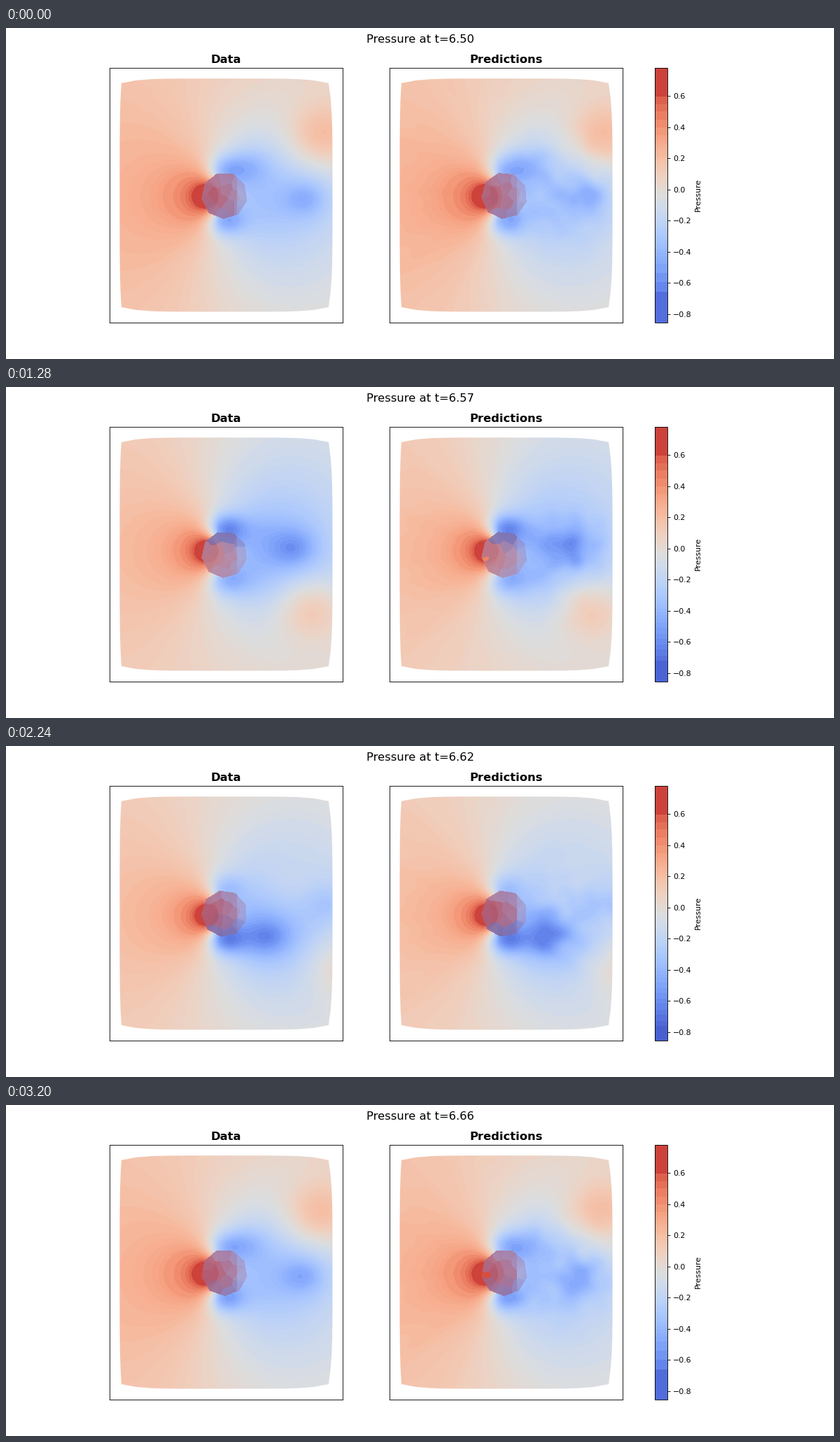
A matplotlib script that plays this animation: 1183 px wide and 473 px high, repeating every 3.36 s.

```python
import numpy as np
import matplotlib.pyplot as plt
from matplotlib.animation import FuncAnimation
from matplotlib.colors import ListedColormap
from matplotlib.patches import Polygon

W, H, DPI = 1183, 473, 78.85
FRAMES, INTERVAL = 21, 160
PERIOD = 20.45              # frames per vortex shedding cycle
VMIN, VMAX = -0.854, 0.782
CX, CY = 313, 240           # cylinder centre in panel pixels
LEFT, RIGHT, TOP, BOTTOM = 162, 468, 72, 406


def wave(n, peak, period=PERIOD):
    return np.cos(2 * np.pi * (n - peak) / period)


def bump(d, width):
    return np.exp(-(d / width) ** 2)


def gauss(dx, dy, sx, sy):
    return np.exp(-0.5 * ((dx / sx) ** 2 + (dy / sy) ** 2))


def outline():
    """Barrel shape: four sides that bend in towards the corners."""
    s = np.linspace(-1, 1, 15)
    top = np.column_stack([CX + 148 * s, 72.5 + 6.5 * s ** 6])
    right = np.column_stack([466.6 - 5.6 * abs(s) ** 5, 239 + 160 * s])
    bottom = np.column_stack([CX - 148 * s, 405.5 - 6.5 * s ** 6])
    left = np.column_stack([162.6 + 2.4 * abs(s) ** 5, 239 - 160 * s])
    return np.vstack([top, right, bottom, left])


def vortex(x, h, age):
    """Low pressure core that drifts downstream and fades."""
    px, py = 345 + 8.1 * age, 24 + 20 * wave(age, 0, 21)
    d2 = ((x - px) / 42) ** 2 + ((h - py) / 34) ** 2
    return 0.33 * bump(age - 6.5, 8.5) * (1 + d2) ** -1.5


def rebound(x, h, age):
    """Raised pressure that trails a vortex on the same side."""
    px, py = 425 + 7 * (age - 17), 84 - (age - 21) ** 2
    return 0.27 * bump(age - 20, 6) * gauss(x - px, h - py, 34, 32)


def pressure(x, y, n):
    """Pressure around the cylinder; y is the height above its centre."""
    p = 0.07 + 0.045 * wave(n, 0.7, PERIOD / 2)
    dx, dy = x - CX + 9, y - 1 - 5 * wave(n, 6.5)
    soft = np.where(dx > 0, 55, 4) ** 2
    p = p - 23 * dx / (dx ** 2 + dy ** 2 + soft)
    p -= 0.16 * gauss(x - 375, y, 90, 110)
    p -= 0.05 * wave(n, 8.5) * np.tanh(y / 80) / (1 + np.exp((300 - x) / 30))
    for side, shift in ((1, 0), (-1, PERIOD / 2)):
        h, age = side * y, n + shift
        p -= (0.32 + 0.15 * wave(age, 6)) * gauss(x - 313, h - 36, 18, 15)
        p -= 0.045 * (1 + wave(age, 4)) * gauss(x - 348, h - 36, 24, 18)
        for a in (age - PERIOD, age, age + PERIOD):
            p += rebound(x, h, a) - vortex(x, h, a)
    return p


def predicted(x, y, n):
    """Same field with a wrinkled wake and faint streaks upstream."""
    rng = np.random.default_rng(40 + n)
    wake = gauss(x - 400, y, 48, 48)
    noise, wx, wy = 0, 0, 0
    for k in range(5):
        a, b, c = rng.uniform(0, 2 * np.pi, 3)
        freq = 0.06 + 0.03 * k
        u = freq * (x * np.cos(a) + y * np.sin(a))
        v = freq * (y * np.cos(a) - x * np.sin(a))
        noise = noise + np.sin(u + b + 1.2 * np.sin(0.7 * v + c))
        wx, wy = wx + np.sin(v + b), wy + np.sin(u + c)
    p = pressure(x + 2.5 * wake * wx, y + 2 * wake * wy, n)
    angle = np.arctan2(y, CX - x)
    rays = np.sin(17 * angle + n) + np.sin(29 * angle + 2 * n)
    reach = np.clip((np.hypot(x - CX, y) - 40) / 120, 0, 1)
    return p + 0.014 * wake * noise + 0.004 * rays * reach * (x < CX)


def banded(low):
    """Diverging map with flat ends and coarse steps next to them."""
    step = 0.035 if low < -0.69 else 0.06
    edges = np.concatenate([[VMIN], np.arange(low, -0.45, step),
                            np.arange(-0.45, 0.34, 0.02),
                            np.arange(0.35, 0.62, 0.05), [VMAX]])
    mids = (edges[:-1] + edges[1:]) / 2
    mids[0] += 0.03
    mids[-1] -= 0.03
    v = np.linspace(VMIN, VMAX, 256)
    idx = np.clip(np.digitize(v, edges) - 1, 0, len(mids) - 1)
    return ListedColormap(plt.cm.coolwarm((mids[idx] - VMIN) / (VMAX - VMIN)))


def mix(a, b, w):
    w = np.asarray(w)[..., None]
    return np.asarray(a) * (1 - w) + np.asarray(b) * w


def body(n, seed):
    """Translucent facets covering the cylinder, as an RGBA image."""
    rng = np.random.default_rng(100 * seed + n)
    ring = np.arange(14)
    r = np.where(ring < 9, 26, 12) + rng.uniform(-4, 4, 14)
    t = ring * 2 * np.pi / np.where(ring < 9, 9, 5) + rng.uniform(-.3, .3, 14)
    sx = np.append(r * np.cos(t), -24)
    sy = np.append(r * np.sin(t), -7)
    warm = 0.66 - 0.24 * wave(n, 6.5)

    red = np.clip(1.25 - np.hypot(sx + 14, sy + 2) / 42, 0, 1)
    color = mix((160, 160, 212), mix((206, 160, 166), (168, 78, 108), warm), red)
    lift = wave(n, 6)
    shade = np.clip((np.sign(lift) * sy - 6) / 16, 0, 1) * abs(lift)
    color = mix(color, (108, 104, 176), 0.85 * shade)
    color[-1] = mix((242, 145, 108), (208, 62, 54), (warm - 0.42) / 0.48)

    gx, gy = np.meshgrid(np.arange(-34, 34) + 0.5, 34 - np.arange(68) - 0.5)
    dist = np.hypot(gx[..., None] - sx, gy[..., None] - sy)
    dist[..., -1] += 5
    cell = dist.argmin(-1)
    turn = np.arange(9) * 2 * np.pi / 9 + 0.2 * rng.random()
    inside = (gx[..., None] * np.cos(turn)
              + gy[..., None] * np.sin(turn)).max(-1) < 31
    alpha = np.where(gx > 18, 0.55, 0.9) * inside
    return np.dstack([color[cell] / 255, alpha])


# The small margin keeps the pixel size from truncating down.
fig, axes = plt.subplots(1, 2, figsize=((W + .01) / DPI, (H + .01) / DPI),
                         dpi=DPI)
xs, hs = np.meshgrid(np.arange(LEFT, RIGHT) + 0.5,
                     CY - np.arange(TOP, BOTTOM) - 0.5)
fields, bodies = [], []
for ax, name in zip(axes, ("Data", "Predictions")):
    field = ax.imshow(np.zeros_like(xs), vmin=VMIN, vmax=VMAX, aspect="auto",
                      extent=(LEFT, RIGHT, BOTTOM, TOP), cmap="coolwarm")
    field.set_clip_path(Polygon(outline(), transform=ax.transData))
    facets = ax.imshow(np.zeros((68, 68, 4)), aspect="auto",
                       extent=(CX - 35, CX + 33, CY + 34, CY - 34))
    ax.set(xlim=(148, 481.4), ylim=(421, 57), xticks=[], yticks=[])
    ax.set_title(name, fontsize=15, fontweight="bold")
    fields.append(field)
    bodies.append(facets)

bar = fig.colorbar(fields[0], ax=axes, label="Pressure")
title = fig.suptitle("", fontsize=15)


def draw(n):
    cmap = banded(-0.725 + 0.07 * wave(n, 0.3, PERIOD / 2))
    for i, solve in enumerate((pressure, predicted)):
        fields[i].set_data(solve(xs, hs, n))
        fields[i].set_cmap(cmap)
        bodies[i].set_data(body(n, i))
    title.set_text(f"Pressure at t={6.5 + 0.00823 * n:.2f}")
    return [*fields, *bodies, title]


anim = FuncAnimation(fig, draw, frames=FRAMES, interval=INTERVAL, repeat=True)
plt.show()
```
